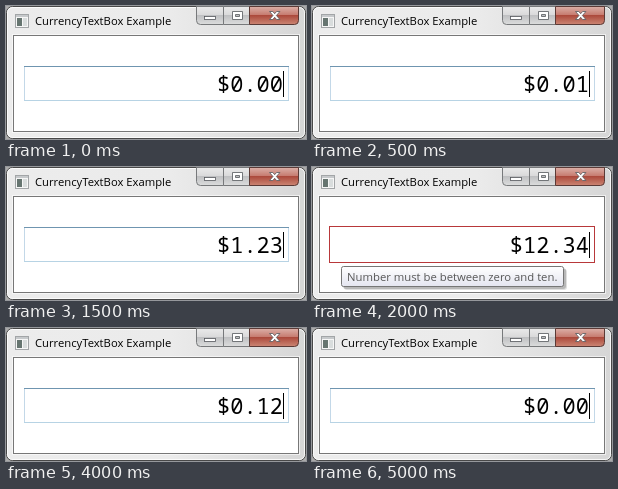
These frames come from a looping animation (300 by 133 pixels, 5500 ms). An HTML page:

```html
<!DOCTYPE html>
<html lang="en">
<head>
<meta charset="utf-8">
<title>CurrencyTextBox Example</title>
<style>
  html, body { margin: 0; width: 100%; height: 100%; overflow: hidden; background: #fff; }
  svg { display: block; width: 300px; height: 133px; }
  text { font-family: "Open Sans", "Noto Sans", sans-serif; }
  #amount { font: 22px "Noto Sans Mono", monospace; text-anchor: end; }
</style>
</head>
<body>
<svg viewBox="0 0 300 133">
  <defs>
    <linearGradient id="glass">
      <stop offset="0" stop-color="#ececec"/>
      <stop offset=".55" stop-color="#ebebeb"/>
      <stop offset="1" stop-color="#d6d6d6"/>
    </linearGradient>
    <linearGradient id="button" x2="0" y2="1">
      <stop offset="0" stop-color="#eaeaea"/>
      <stop offset=".48" stop-color="#d9d9da"/>
      <stop offset=".5" stop-color="#bfc0c2"/>
      <stop offset="1" stop-color="#dcdddd"/>
    </linearGradient>
    <linearGradient id="close" x2="0" y2="1">
      <stop offset="0" stop-color="#dcb0a8"/>
      <stop offset=".48" stop-color="#c67a6e"/>
      <stop offset=".5" stop-color="#ac4a3c"/>
      <stop offset="1" stop-color="#cc8674"/>
    </linearGradient>
    <linearGradient id="tipFill" x2="0" y2="1">
      <stop offset="0" stop-color="#fff"/>
      <stop offset="1" stop-color="#e4e5f0"/>
    </linearGradient>
  </defs>

  <!-- window frame -->
  <rect width="300" height="133" fill="#aaa"/>
  <rect x=".5" y=".5" width="299" height="132" rx="6" fill="url(#glass)" stroke="#484848"/>
  <rect x="1.5" y="1.5" width="297" height="130" rx="5" fill="none" stroke="#fff" stroke-opacity=".8"/>
  <rect x="6.5" y="28.5" width="287" height="98" fill="none" stroke="#fff" stroke-opacity=".6"/>
  <rect x="7.5" y="29.5" width="285" height="96" fill="#fff" stroke="#777"/>

  <!-- title -->
  <rect x="9.5" y="8.5" width="13" height="13" fill="#f6f6f6" stroke="#a2a5a7"/>
  <path d="M10 10h12" stroke="#c6c9cb" stroke-width="2"/>
  <rect x="11" y="12" width="5" height="8" fill="#667570"/>
  <rect x="17" y="12" width="4" height="8" fill="#d9dddd"/>
  <text x="29" y="19" font-size="11.25" fill="#000">CurrencyTextBox Example</text>

  <!-- caption buttons -->
  <g stroke="#77797b">
    <path d="M190.5 .5H217.5V18.5H194.5Q190.5 18.5 190.5 14.5Z" fill="url(#button)"/>
    <path d="M217.5 .5H243.5V18.5H217.5Z" fill="url(#button)"/>
    <path d="M243.5 .5H292.5V14.5Q292.5 18.5 288.5 18.5H243.5Z" fill="url(#close)" stroke="#5b3a36"/>
  </g>
  <g fill="#fff" stroke="#55585c" stroke-width=".8">
    <rect x="198.5" y="10.5" width="11" height="3"/>
    <path fill-rule="evenodd" d="M226.5 5.5h10v8h-10zM229.5 8.5v2h4v-2z"/>
    <path d="M263.5 5.5h3.3l1.9 2.2 1.9-2.2h3.3l-3.5 4 3.5 4h-3.3l-1.9-2.2-1.9 2.2h-3.3l3.5-4z"/>
  </g>

  <!-- text box -->
  <g id="normal" fill="none">
    <path d="M18.5 61V94M282.5 61V94" stroke="#c3d8e8"/>
    <path d="M18 94.5H283" stroke="#b7d3e4"/>
    <path d="M18 60.5H283" stroke="#6f95b0"/>
  </g>
  <rect id="error" x="17.5" y="59.5" width="265" height="36" fill="none" stroke="#b8383a"/>
  <text id="amount" x="277" y="86"></text>
  <path d="M277.5 65V91" stroke="#000"/>

  <!-- validation tooltip -->
  <g id="tip">
    <rect x="32" y="102" width="223" height="21" rx="3" fill="#000" opacity=".12"/>
    <rect x="31" y="101" width="223" height="21" rx="3" fill="#000" opacity=".18"/>
    <rect x="29.5" y="99.5" width="222" height="20" rx="2" fill="url(#tipFill)" stroke="#767676"/>
    <text x="35" y="113.5" font-size="11.3" fill="#575757">Number must be between zero and ten.</text>
  </g>
</svg>
<script>
  const STEP = 500, LOOP = 5500, LIMIT = 10;
  // One value per half second: digits typed in, a pause, digits deleted.
  const values = [0, 0.01, 0.12, 1.23, 12.34, 12.34, 12.34, 1.23, 0.12, 0.01, 0];
  const get = id => document.getElementById(id);
  const show = (id, on) => get(id).setAttribute("visibility", on ? "visible" : "hidden");

  function draw() {
    const value = values[Math.floor(performance.now() % LOOP / STEP)];
    const invalid = value > LIMIT;
    get("amount").textContent = "$" + value.toFixed(2);
    show("normal", !invalid);
    show("error", invalid);
    show("tip", invalid);
    requestAnimationFrame(draw);
  }
  draw();
</script>
</body>
</html>
```
